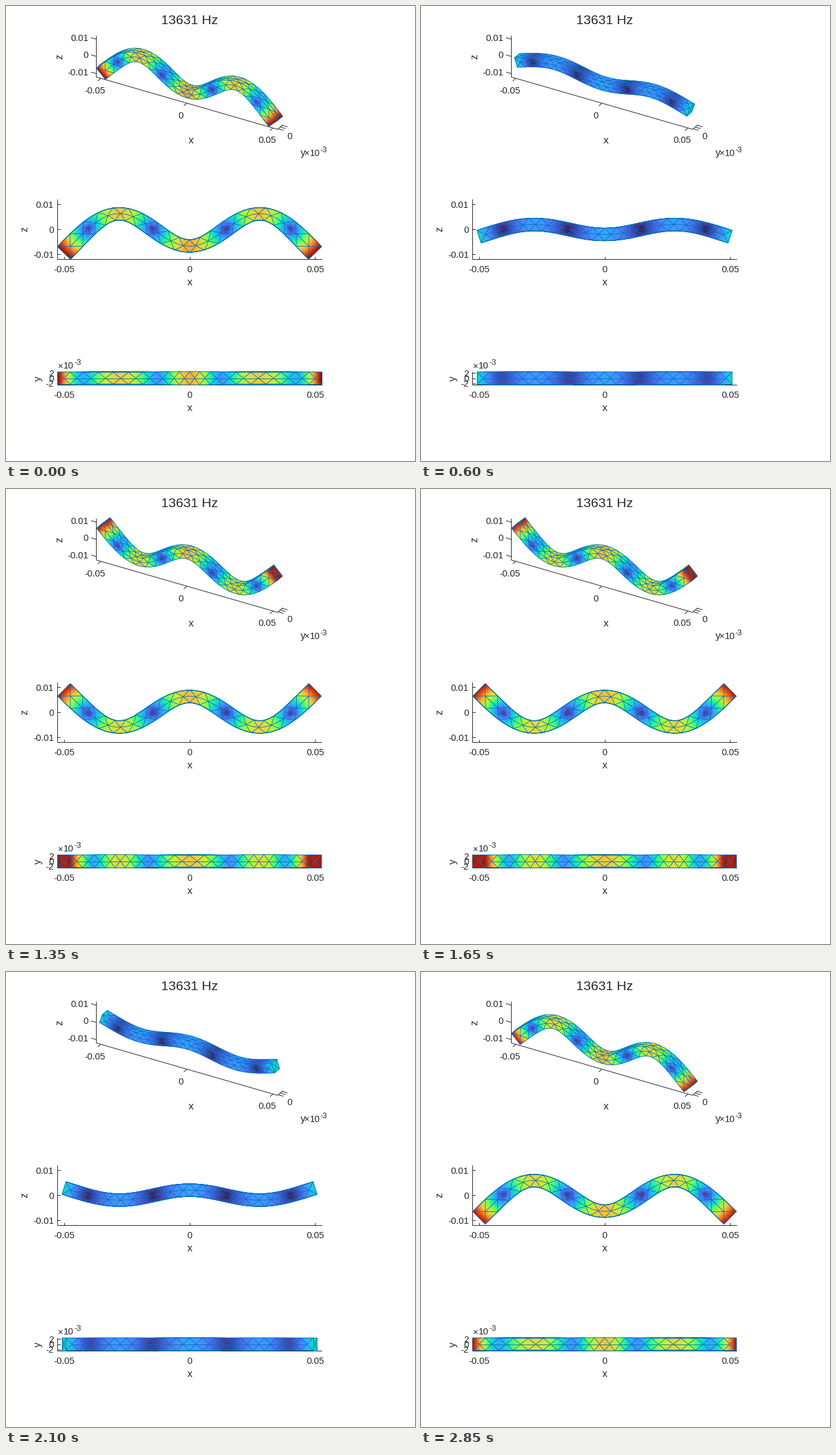
These frames come from a looping animation (654x728 px, 3000 ms). A matplotlib script:

```python
import itertools
import numpy as np
import matplotlib.pyplot as plt
from matplotlib.animation import FuncAnimation
from matplotlib.collections import LineCollection
from matplotlib.tri import Triangulation

W, H, DPI = 654, 728, 100
PX = 72 / DPI                       # points per pixel
FRAMES, INTERVAL = 20, 150
INK, EDGE = "#262626", (0, 0.447, 0.741)

# Free-free beam, third bending mode (metres)
LENGTH, HALF, CELLS = 0.1, 0.0025, 20
BETA = 10.9956 / LENGTH
TIP, POISSON = 0.0094, 0.3
XLIM, YLIM, ZLIM = 0.0526, 0.00264, 0.012

plt.rcParams["font.family"] = "Liberation Sans"
fig = plt.figure(figsize=(W / DPI, H / DPI), dpi=DPI, facecolor="white")
ax = fig.add_axes([0, 0, 1, 1])
ax.set_xlim(0, W)
ax.set_ylim(H, 0)
ax.set_autoscale_on(False)
ax.axis("off")


class View:
    """Orthographic camera that maps beam space to stage pixels."""

    def __init__(self, az, el, scale, cx, cy):
        a, e = np.radians([az, el])
        self.right = np.array([np.cos(a), np.sin(a), 0])
        self.up = np.array([-np.sin(e) * np.sin(a), np.sin(e) * np.cos(a), np.cos(e)])
        self.scale, self.cx, self.cy = scale, cx, cy

    def __call__(self, points):
        p = np.asarray(points, float)
        return np.stack([self.cx + self.scale * (p @ self.right),
                         self.cy - self.scale * (p @ self.up)], axis=-1)


ISO = View(30, 30, 3180, 293.5, 118.8)
FRONT = View(0, 0, 4015, 293.5, 357.3)
TOP = View(0, 90, 4015, 293.5, 595.5)


def build_mesh():
    """Six-node surface triangles (corners, then edge middles), wound outwards."""
    tris = []
    xs = np.linspace(-LENGTH / 2, LENGTH / 2, CELLS + 1)
    mids = (xs[:-1] + xs[1:]) / 2

    def strip(place):
        for s in (-HALF, HALF):
            for k in range(CELLS):
                m = place(mids[k], 0)
                tris.append([place(xs[k], s), place(xs[k + 1], s), m])
                if k:
                    tris.append([place(xs[k], s), place(mids[k - 1], 0), m])
        for x, m in ((xs[0], mids[0]), (xs[-1], mids[-1])):
            tris.append([place(x, -HALF), place(x, HALF), place(m, 0)])

    for side in (-HALF, HALF):
        strip(lambda x, s: (x, s, side))
        strip(lambda x, s: (x, side, s))

    ring = [(-HALF, -HALF), (HALF, -HALF), (HALF, HALF), (-HALF, HALF)]
    for x in (xs[0], xs[-1]):
        for k in range(4):
            tris.append([(x, 0, 0), (x, *ring[k]), (x, *ring[(k + 1) % 4])])

    t = np.array(tris)
    normal = np.cross(t[:, 1] - t[:, 0], t[:, 2] - t[:, 0])
    inward = np.sum(normal * t.mean(axis=1), axis=1) < 0
    t[inward] = t[inward][:, ::-1]
    t = np.concatenate([t, (t + np.roll(t, -1, axis=1)) / 2], axis=1)
    nodes, index = np.unique(np.round(t.reshape(-1, 3), 6), axis=0, return_inverse=True)
    return nodes, index.reshape(-1, 6)


def mode_shape(nodes):
    """Displacement of every node at full deflection."""
    x, y, z = nodes.T
    b, half = BETA, BETA * LENGTH / 2
    c, ch = np.cos(half), np.cosh(half)
    w = TIP / 2 * (np.cos(b * x) / c + np.cosh(b * x) / ch)
    slope = TIP / 2 * b * (-np.sin(b * x) / c + np.sinh(b * x) / ch)
    curve = TIP / 2 * b * b * (-np.cos(b * x) / c + np.cosh(b * x) / ch)
    return np.stack([-z * slope,
                     POISSON * y * z * curve,
                     w + POISSON / 2 * (z * z - y * y) * curve], axis=-1)


def sub_triangles(n):
    """Barycentric grid and its small triangles."""
    grid = [(i, j) for i, j in itertools.product(range(n + 1), repeat=2) if i + j <= n]
    at = {g: k for k, g in enumerate(grid)}
    small = []
    for i, j in grid:
        if i + j < n:
            small.append((at[i, j], at[i + 1, j], at[i, j + 1]))
        if i + j < n - 1:
            small.append((at[i + 1, j], at[i + 1, j + 1], at[i, j + 1]))
    bary = np.array([(i, j, n - i - j) for i, j in grid]) / n
    return bary, np.array(small)


NODES, TRIS = build_mesh()
MODE = mode_shape(NODES)
PEAK = np.linalg.norm(MODE, axis=1).max()
BARY, SMALL = sub_triangles(2)
QUARTERS = [(0, 3, 5), (3, 1, 4), (5, 4, 2), (3, 4, 5)]
SIDES = [(0, 3, 1), (1, 4, 2), (2, 5, 0)]


# Static axes and labels
def line(*points):
    x, y = zip(*points)
    ax.plot(x, y, color=INK, lw=PX, zorder=1, solid_capstyle="butt")


def label(x, y, text, size=14.67, ha="center", rotation=0):
    ax.text(x, y, text, fontsize=size * PX, color=INK, ha=ha, va="baseline",
            rotation=rotation, rotation_mode="anchor", zorder=4)


def exponent(x, y):
    label(x, y, "×", ha="left")
    label(x + 9.3, y, "10", ha="left")
    label(x + 26.3, y - 6.5, "-3", size=12.5, ha="left")


def tick3d(point, direction):
    start = np.array(point)
    line(*ISO([start, start + 0.0031 * np.array(direction)]))


def draw_iso_axes():
    line(*ISO([(-XLIM, -YLIM, ZLIM), (-XLIM, -YLIM, -ZLIM),
               (XLIM, -YLIM, -ZLIM), (XLIM, YLIM, -ZLIM)]))
    for x in (-0.05, 0, 0.05):
        tick3d((x, -YLIM, -ZLIM), (0, -1, 0))
    for y in (-0.002, 0, 0.002):
        tick3d((XLIM, y, -ZLIM), (1, 0, 0))
    for z in (-0.01, 0, 0.01):
        tick3d((-XLIM, -YLIM, z), (-1, 0, 0))
    for y, text in ((56, "0.01"), (83.3, "0"), (111, "-0.01")):
        label(131.5, y, text, ha="right")
    for x, y, text in ((142, 140, "-0.05"), (280, 179.5, "0"),
                       (418, 219, "0.05"), (454, 213.3, "0")):
        label(x, y, text)
    label(296, 220.5, "x", 16.1)
    label(475, 240, "y", 16.1)
    label(90, 81, "z", 16.1, rotation=90)
    exponent(476.5, 240)


def draw_flat_axes(view, limit, ticks, name, name_x):
    left, right = view.cx - XLIM * view.scale, view.cx + XLIM * view.scale
    top, bottom = view.cy - limit * view.scale, view.cy + limit * view.scale
    line((left, top), (left, bottom))
    line((left, bottom), (right, bottom))
    for x, text in ((-0.05, "-0.05"), (0, "0"), (0.05, "0.05")):
        px = view.cx + x * view.scale
        line((px, bottom), (px, bottom - 4.2))
        label(px, bottom + 21, text)
    for v, text in ticks:
        py = view.cy - v * view.scale
        line((left, py), (left + 4.2, py))
        label(76.5, py + 5.5, text, ha="right")
    label(view.cx + 0.5, bottom + 42, "x", 16.1)
    label(name_x, view.cy, name, 16.1, rotation=90)


label(293.5, 29, "13631 Hz", 21.33)
draw_iso_axes()
draw_flat_axes(FRONT, ZLIM, ((0.01, "0.01"), (0, "0"), (-0.01, "-0.01")), "z", 34.5)
draw_flat_axes(TOP, YLIM, ((0.002, "2"), (0, "0"), (-0.002, "-2")), "y", 56)
exponent(83, 580.3)

moving = []


def draw_beam(view, points, size):
    xy = view(points)
    a, b, c = (xy[TRIS[:, k]] for k in range(3))
    u, v = b - a, c - a
    facing = u[:, 0] * v[:, 1] - u[:, 1] * v[:, 0] < -1e-6
    seen = TRIS[facing]

    tris = seen[:, QUARTERS].reshape(-1, 3)
    fine = np.einsum("qk,mkd->mqd", BARY, xy[tris]).reshape(-1, 2)
    values = (size[tris] @ BARY.T).ravel()
    offsets = np.arange(len(tris))[:, None, None] * len(BARY)
    mesh = Triangulation(fine[:, 0], fine[:, 1], (SMALL + offsets).reshape(-1, 3))
    moving.append(ax.tripcolor(mesh, values, shading="gouraud", cmap="turbo",
                               vmin=0, vmax=PEAK, zorder=2))

    sides = seen[:, SIDES].reshape(-1, 3)
    _, first = np.unique(sides[:, 1], return_index=True)
    edges = LineCollection(xy[sides[first]], colors=[EDGE],
                           linewidths=0.9 * PX, zorder=3)
    moving.append(ax.add_collection(edges, autolim=False))


def update(frame):
    while moving:
        moving.pop().remove()
    shift = -np.cos(2 * np.pi * frame / FRAMES) * MODE
    size = np.linalg.norm(shift, axis=1)
    for view in (ISO, FRONT, TOP):
        draw_beam(view, NODES + shift, size)
    return moving


anim = FuncAnimation(fig, update, frames=FRAMES, interval=INTERVAL,
                     repeat=True, repeat_delay=0, blit=False)
plt.show()
```
